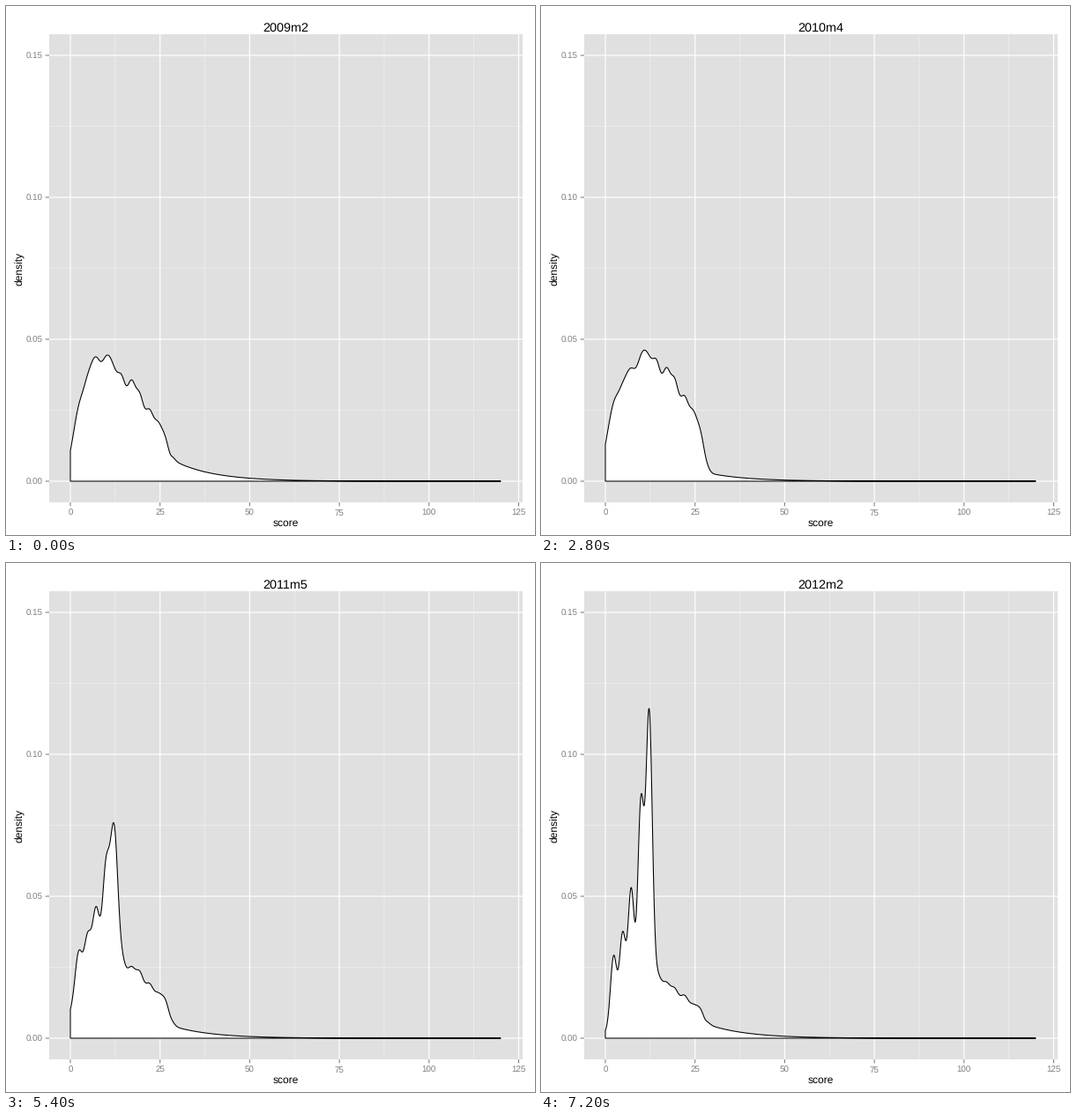
Recreate the animation shown at these times as a matplotlib script. Size 600 by 600 pixels, loop 7.4 s.

```python
import numpy as np
import matplotlib.pyplot as plt
from matplotlib.animation import FuncAnimation
from matplotlib.patches import Polygon, Rectangle

FRAMES, INTERVAL = 37, 200
PX = 0.72  # points per pixel at 100 dpi
LEFT, RIGHT, TOP, BOTTOM = 49, 586, 32, 563
X0, Y0 = 73, 539
GREY = "#7f7f7f"

plt.rcParams["font.family"] = "Liberation Sans"
plt.rcParams["text.hinting"] = "none"

# Scores where the bumps sit, and the curve's height (px) there by month.
BUMPS = np.array([0, 2.3, 4.8, 7.2, 9.9, 12.2, 14.5, 17, 19.4, 22, 24.4, 26.6])
HEIGHTS = {
    0: [35, 86, 121, 141, 142, 130, 119, 115, 100, 82, 68, 49],
    5: [31, 87, 121, 143, 158, 147, 138, 129, 115, 89, 68, 44],
    18: [47, 91, 108, 122, 137, 141, 135, 129, 117, 101, 87, 62],
    23: [44, 116, 136, 156, 173, 180, 107, 91, 84, 69, 57, 43],
    31: [21, 82, 104, 143, 235, 306, 93, 72, 68, 56, 47, 43],
    36: [9, 94, 121, 171, 275, 374, 81, 64, 57, 49, 39, 33],
}
scores = np.linspace(0, 120, 1201)


def tail(score, step):
    """Exponential tail that fades in above a score of 28."""
    size = np.interp(step, [0, 5, 18, 31], [23, 9, 9, 15])
    return size * np.exp((29 - score) / 11) / (1 + np.exp((28.2 - score) / 0.4))


def bells(score, step):
    """One Gaussian per bump; the low scores sharpen over time."""
    sharp = np.interp(step, [18, 32], [1.4, 0.9])
    width = np.where(BUMPS < 13, sharp, 1.2)
    return np.exp(-((score[:, None] - BUMPS) / width) ** 2 / 2)


def outline(step):
    goal = [np.interp(step, list(HEIGHTS), h) for h in zip(*HEIGHTS.values())]
    weights = np.linalg.solve(bells(BUMPS, step), goal - tail(BUMPS, step))
    return np.maximum(bells(scores, step) @ weights + tail(scores, step), 0)


def sx(score):
    return X0 + 4.068 * score


def sy(value):
    return Y0 - 3220 * value


fig = plt.figure(figsize=(6, 6), dpi=100, facecolor="white")
ax = fig.add_axes([0, 0, 1, 1])
ax.set_xlim(0, 600)
ax.set_ylim(600, 0)
ax.axis("off")


def line(x, y, color, width, z):
    ax.plot(x, y, color=color, lw=width * PX, zorder=z, snap=False,
            solid_capstyle="butt")


def label(x, y, text, size, color="black", **kw):
    kw = {"ha": "center", "va": "baseline", **kw}
    return ax.text(x, y, text, fontsize=size * PX, color=color, **kw)


ax.add_patch(Rectangle((LEFT, TOP), RIGHT - LEFT, BOTTOM - TOP,
                       fc="#e0e0e0", ec="none", zorder=0))

for s in np.arange(12.5, 125, 25):
    line([sx(s)] * 2, [TOP, BOTTOM], "#f2f2f2", 0.6, 1)
for v in (0.025, 0.075, 0.125):
    line([LEFT, RIGHT], [sy(v)] * 2, "#f2f2f2", 0.6, 1)

for s in range(0, 126, 25):
    line([sx(s)] * 2, [TOP, BOTTOM], "white", 1.2, 2)
    line([sx(s)] * 2, [BOTTOM, BOTTOM + 4.3], GREY, 1.07, 2)
    label(sx(s), 578, str(s), 9.8, GREY)
for v in (0, 0.05, 0.1, 0.15):
    line([LEFT, RIGHT], [sy(v)] * 2, "white", 1.2, 2)
    line([LEFT - 4.3, LEFT], [sy(v)] * 2, GREY, 1.07, 2)
    label(41.8, sy(v) + 4, f"{v:.2f}", 9.8, GREY, ha="right")

label(317, 590, "score", 12)
label(19, 298, "density", 12, rotation=90, rotation_mode="anchor")
title = label(317, 28.6, "", 14.4)

area = Polygon([(X0, Y0), (sx(120), Y0)], closed=True, fc="white", ec="black",
               lw=1.07 * PX, joinstyle="round", snap=False, zorder=3)
ax.add_patch(area)


def draw(step):
    year, month = divmod(step + 1, 12)
    title.set_text(f"{2009 + year}m{month + 1}")
    curve = np.column_stack([sx(scores), Y0 - outline(step)])
    area.set_xy(np.vstack([[X0, Y0], curve, [sx(120), Y0]]))
    return area, title


anim = FuncAnimation(fig, draw, frames=FRAMES, interval=INTERVAL,
                     repeat=True, repeat_delay=0, blit=False)
plt.show()
```
